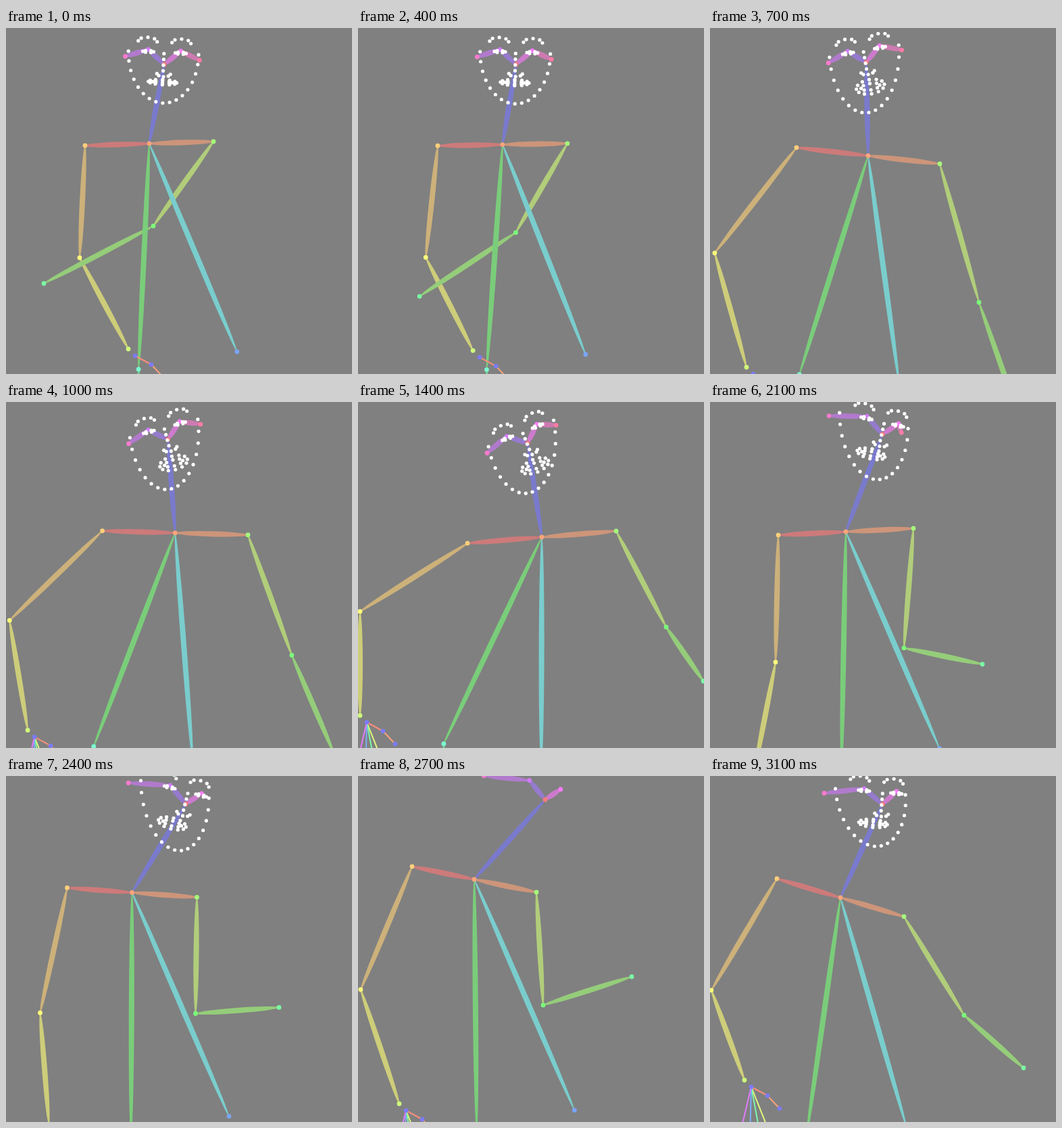
These frames come from a looping animation (512 px wide and 512 px high, 3200 ms). An HTML page with a canvas:

```html
<!DOCTYPE html>
<html lang="en">
<head>
<meta charset="utf-8">
<title>Dancing skeleton</title>
<style>
  html, body { margin: 0; width: 100%; height: 100%; overflow: hidden; background: #808080; }
  canvas { display: block; }
</style>
</head>
<body>
<canvas id="stage" width="512" height="512"></canvas>
<script>
const ctx = document.getElementById('stage').getContext('2d');
const LOOP = 3200, STEP = 100, TURN = Math.PI * 2;

// Key poses. shoulder and spine are vectors from the neck;
// head is [roll in degrees, sideways turn, nod].
const poses = [
  { time: 0, neck: [212, 171], shoulder: [95, -3], spine: [57, 321], nose: [234, 54], head: [3, -3, -13],
    rElbow: [109, 340], rWrist: [181, 475], lElbow: [218, 293], lWrist: [56, 378] },
  { time: 700, neck: [234, 189], shoulder: [106, 12], spine: [-28, 330], nose: [231, 51], head: [-10, 0, 4],
    rElbow: [7, 333], rWrist: [54, 502], lElbow: [398, 406], lWrist: [466, 600] },
  { time: 1400, neck: [272, 200], shoulder: [110, -9], spine: [-73, 322], nose: [251, 61], head: [-22, -6, 2],
    rElbow: [3, 310], rWrist: [3, 464], lElbow: [456, 333], lWrist: [511, 413] },
  { time: 1700, neck: [245, 179], shoulder: [104, -5], spine: [-11, 345], nose: [249, 33], head: [-3, -6, 7],
    rElbow: [5, 330], rWrist: [12, 470], lElbow: [436, 317], lWrist: [486, 453] },
  { time: 2100, neck: [201, 192], shoulder: [100, -5], spine: [66, 335], nose: [255, 48], head: [13, -28, -4],
    rElbow: [97, 385], rWrist: [66, 545], lElbow: [287, 364], lWrist: [403, 388] },
  { time: 2700, neck: [172, 153], shoulder: [92, 19], spine: [76, 357], nose: [277, 35], head: [16, -42, 0],
    rElbow: [4, 316], rWrist: [61, 485], lElbow: [274, 339], lWrist: [405, 297] },
  { time: 3100, neck: [193, 180], shoulder: [94, 28], spine: [24, 345], nose: [255, 42], head: [5, -32, -8],
    rElbow: [2, 317], rWrist: [51, 450], lElbow: [376, 354], lWrist: [464, 432] }
];

// List order sets the hue: 20 degrees per entry.
const jointNames = ['nose', 'neck', 'rShoulder', 'rElbow', 'rWrist', 'lShoulder', 'lElbow', 'lWrist',
  'rHip', 'rKnee', 'rAnkle', 'lHip', 'lKnee', 'lAnkle', 'rEye', 'lEye', 'rEar', 'lEar'];
const limbs = [
  ['neck', 'rShoulder'], ['neck', 'lShoulder'], ['rShoulder', 'rElbow'], ['rElbow', 'rWrist'],
  ['lShoulder', 'lElbow'], ['lElbow', 'lWrist'], ['neck', 'rHip'], ['rHip', 'rKnee'], ['rKnee', 'rAnkle'],
  ['neck', 'lHip'], ['lHip', 'lKnee'], ['lKnee', 'lAnkle'], ['neck', 'nose'],
  ['nose', 'rEye'], ['rEye', 'rEar'], ['nose', 'lEye'], ['lEye', 'lEar']
];

const bright = hue => `hsl(${hue}, 92%, 73%)`;
const muted = hue => `hsl(${hue}, 45%, 64%)`;
const offset = ([x, y], dx, dy) => [x + dx, y + dy];

function poseAt(t) {
  const next = Math.max(1, poses.findIndex(p => p.time >= t));
  const a = poses[next - 1], b = poses[next];
  let k = (t - a.time) / (b.time - a.time);
  if (next === 1 && k < 1) k *= 0.15; // slow drift, then a cut
  const pose = {};
  for (const name in a) {
    if (name !== 'time') pose[name] = a[name].map((v, i) => v + (b[name][i] - v) * k);
  }
  return pose;
}

// Maps points given relative to the nose into the rolled head.
function headFrame({ nose, head }) {
  const roll = head[0] * Math.PI / 180;
  const c = Math.cos(roll), s = Math.sin(roll);
  return (x, y) => offset(nose, x * c - y * s, x * s + y * c);
}

function buildJoints(pose, place) {
  const { neck, shoulder: [sx, sy], spine: [px, py], head: [, turn] } = pose;
  const hip = 74 / Math.hypot(px, py); // the hip line is square to the spine
  const rHip = offset(neck, px - py * hip, py + px * hip);
  return {
    ...pose,
    rShoulder: offset(neck, -sx, -sy),
    lShoulder: offset(neck, sx, sy),
    rHip,
    lHip: offset(neck, px + py * hip, py - px * hip),
    rKnee: offset(rHip, 3, 130),
    rEye: place(-24 + turn * 0.15, -21),
    lEye: place(24 + turn * 0.15, -21),
    rEar: place(-55 + turn, -9),
    lEar: turn > -30 && place(55 + turn, -9)
  };
}

function dot([x, y], radius, color) {
  ctx.fillStyle = color;
  ctx.beginPath();
  ctx.arc(x, y, radius, 0, TURN);
  ctx.fill();
}

function limb([ax, ay], [bx, by], color) {
  ctx.fillStyle = color;
  ctx.beginPath();
  ctx.ellipse((ax + bx) / 2, (ay + by) / 2, Math.hypot(bx - ax, by - ay) / 2, 4,
    Math.atan2(by - ay, bx - ax), 0, TURN);
  ctx.fill();
}

function line(a, b, hue) {
  ctx.strokeStyle = bright(hue);
  ctx.lineWidth = 2;
  ctx.beginPath();
  ctx.moveTo(...a);
  ctx.lineTo(...b);
  ctx.stroke();
}

function drawFace({ nose, head: [roll, turn, nod] }, place) {
  const facePoint = p => dot(p, 2.6, '#fff');
  const arcDots = (cx, cy, rx, ry, count, from, sweep) => {
    for (let i = 0; i < count; i++) {
      const angle = from + sweep * i / count;
      facePoint(place(cx + rx * Math.cos(angle), cy + ry * Math.sin(angle)));
    }
  };

  const shift = turn * 0.35;
  const [jawX, jawY] = place(turn * 0.6, -17);
  const jawEnd = place(52 + turn * 0.6, -17);
  const chin = offset(nose, turn * 0.3 - roll * 0.4, 70 + nod);
  for (let i = 0; i <= 16; i++) {
    const c = Math.cos(Math.PI * i / 16), s = Math.sin(Math.PI * i / 16);
    facePoint([jawX + (jawEnd[0] - jawX) * c + (chin[0] - jawX) * s,
      jawY + (jawEnd[1] - jawY) * c + (chin[1] - jawY) * s]);
  }
  for (const side of [-1, 1]) {
    arcDots(side * 25 + shift, -33, 14, 6, 5, Math.PI, Math.PI * 1.25);
    arcDots(side * 24 + turn * 0.15, -18, 8, 1.5, 6, 0, TURN);
  }
  for (let i = 0; i < 4; i++) facePoint(place(-1, -16 + 8.5 * i));
  arcDots(0, 14, 10, 4, 5, 0, Math.PI * 1.25);
  const mouthY = 34 + nod * 0.6, open = 9 + nod * 0.4;
  arcDots(shift, mouthY, 21, open, 12, 0, TURN);
  arcDots(shift, mouthY, 14, open * 0.45, 8, 0, TURN);
}

function drawHand(wrist, showFingers) {
  const palm = offset(wrist, 10, 10);
  const thumb = offset(palm, 24, 13), tip = offset(palm, 42, 32);
  line(palm, thumb, 9);
  line(thumb, tip, 18);
  if (showFingers) {
    for (let i = 0; i < 4; i++) line(palm, offset(palm, 32 - 17 * i, 80), 72 * (i + 1));
  }
  for (const p of [palm, thumb, tip]) dot(p, 3.3, bright(240));
}

function draw(t) {
  ctx.fillStyle = '#808080';
  ctx.fillRect(0, 0, 512, 512);

  const pose = poseAt(t);
  const place = headFrame(pose);
  const joints = buildJoints(pose, place);

  limbs.forEach(([a, b], i) => {
    if (joints[a] && joints[b]) limb(joints[a], joints[b], muted(i * 20));
  });
  jointNames.forEach((name, i) => {
    if (joints[name]) dot(joints[name], 3.4, bright(i * 20));
  });
  drawHand(joints.rWrist, t >= 700);
  if (pose.head[1] > -38) drawFace(pose, place); // lost when turned too far
}

const start = performance.now();
function tick() {
  const elapsed = (performance.now() - start) % LOOP;
  draw(Math.floor(elapsed / STEP) * STEP);
  requestAnimationFrame(tick);
}
tick();
</script>
</body>
</html>
```
